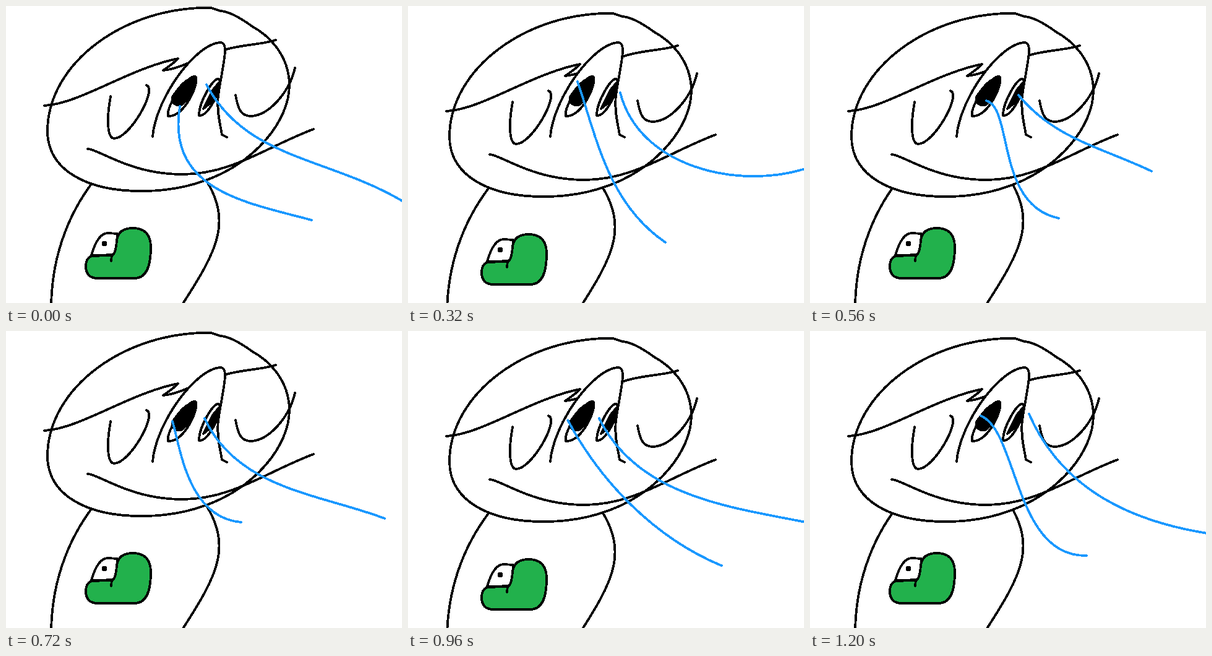
An HTML page that plays this animation: 640 by 480 pixels, repeating every 1280 ms.

```html
<!DOCTYPE html>
<html lang="en">
<head>
<meta charset="utf-8">
<title>Runny nose</title>
<style>
  html, body { margin: 0; width: 100%; height: 100%; overflow: hidden; background: #fff; }
  svg { display: block; width: 100vw; height: 100vh; }
  path { fill: none; stroke: #000; stroke-width: 3.8; stroke-linecap: round; stroke-linejoin: round; }
  .white { fill: #fff; }
  .green { fill: #22b14c; }
  .black { fill: #000; }
  .water { stroke: #1a98ff; }
</style>
</head>
<body>
<svg viewBox="0 0 640 480" shape-rendering="crispEdges">
  <g id="body">
    <path d="M152 270C105 325 73 400 73 490"/>
    <path d="M312 264C370 345 345 390 280 490"/>
    <path class="white" d="M138 403Q148 367 165 367L180 368 178 402Z"/>
    <path class="green" d="M138 404L172 403Q178 398 179 378Q182 359 205 359Q234 359 234 390Q234 440 208 440H148Q129 440 129 420Q129 408 138 404Z"/>
    <path d="M171 402L170 412"/>
    <path class="black" d="M157 382h4v4h-4z"/>
  </g>
  <g id="head">
    <path class="white" d="M331 3C195 0 67 90 67 203C68 265 130 300 222 299C262 299 295 292 325 281C402 252 458 187 458 127C457 75 420 45 398 33C380 20 360 9 347 8Z"/>
    <path d="M62 161C120 158 200 100 278 85Q272 92 254 104C285 101 310 82 356 70C385 62 415 62 436 55"/>
    <path d="M169 146C162 185 164 214 175 214C200 214 245 135 227 128"/>
    <path d="M371 144C376 172 382 178 397 178C425 176 458 140 467 100"/>
    <path d="M132 231C150 231 200 272 285 272C365 272 420 228 497 199"/>
  </g>
  <g id="nose">
    <path class="white" d="M237 211C242 150 305 62 346 59C362 59 350 95 343 145C340 170 347 195 349 208L357 212"/>
    <path class="white" d="M262 178C258 160 295 110 306 114C314 120 290 180 262 178Z"/>
    <path class="black" d="M269 147Q292 112 306 118Q300 150 283 160Q268 162 269 147Z"/>
    <path class="white" d="M312 177C312 155 335 115 344 118C352 126 328 180 312 177Z"/>
    <path class="black" d="M319 166L334 136 344 124Q342 150 319 166Z"/>
  </g>
  <path class="water"/>
  <path class="water"/>
</svg>
<script>
const STEP = 80;
const LOOP = 1280;

const [body, head, nose] = ['body', 'head', 'nose'].map(id => document.getElementById(id));
const streams = document.querySelectorAll('.water');

// Each stream passes through four points; the steps between the poses are blended.
const pose = (step, ...lines) => ({
  step,
  lines: lines.map(line => line.split(' ').map(point => point.split(',').map(Number)))
});
const poses = [
  pose(0, '281,162 303,264 387,316 494,346', '324,127 408,214 520,262 642,316'),
  pose(1, '267,143 325,261 410,356 531,413', '302,145 405,211 518,253 642,277'),
  pose(3, '274,122 304,216 345,307 416,382', '343,140 410,233 523,273 642,263'),
  pose(6, '285,153 312,203 336,287 402,343', '337,144 401,199 474,234 552,267'),
  pose(9, '261,143 270,205 305,265 369,292', '313,140 396,239 518,287 642,321'),
  pose(12, '257,145 347,255 455,347 576,423', '307,142 395,233 512,280 638,302'),
  pose(14, '276,137 321,207 364,311 447,363', '354,134 426,235 526,296 642,327')
];

// Cubic curve that meets the inner points at one and two thirds of its way.
function curveThrough([a, b, c, d]) {
  const handle = (p, q, r, s) => p.map((_, i) => (-5 * p[i] + 18 * q[i] - 9 * r[i] + 2 * s[i]) / 6);
  return `M${a}C${handle(a, b, c, d)} ${handle(d, c, b, a)} ${d}`;
}

const mix = (a, b, u) => a.map((v, i) => v + (b[i] - v) * u);

function streamPath(step, side) {
  const next = Math.max(1, poses.findIndex(p => p.step >= step));
  const a = poses[next - 1], b = poses[next];
  const u = (step - a.step) / (b.step - a.step);
  return curveThrough(a.lines[side].map((point, i) => mix(point, b.lines[side][i], u)));
}

const move = (part, x, y) => part.setAttribute('transform', `translate(${x} ${y})`);
// Parts toggle between two places, each at its own pace.
const toggled = (step, hold) => Math.floor(step / hold) % 2;

function render(time) {
  // The first drawing stays for two steps.
  const step = Math.max(0, Math.floor(time % LOOP / STEP) - 1);
  const shift = 10 * toggled(step, 3);
  move(nose, -7 * toggled(step, 1), 0);
  move(head, 0, 9 * toggled(step, 2));
  move(body, -shift, shift);
  streams.forEach((path, side) => path.setAttribute('d', streamPath(step, side)));
}

const start = performance.now();
function tick() {
  render(performance.now() - start);
  requestAnimationFrame(tick);
}
tick();
</script>
</body>
</html>
```
